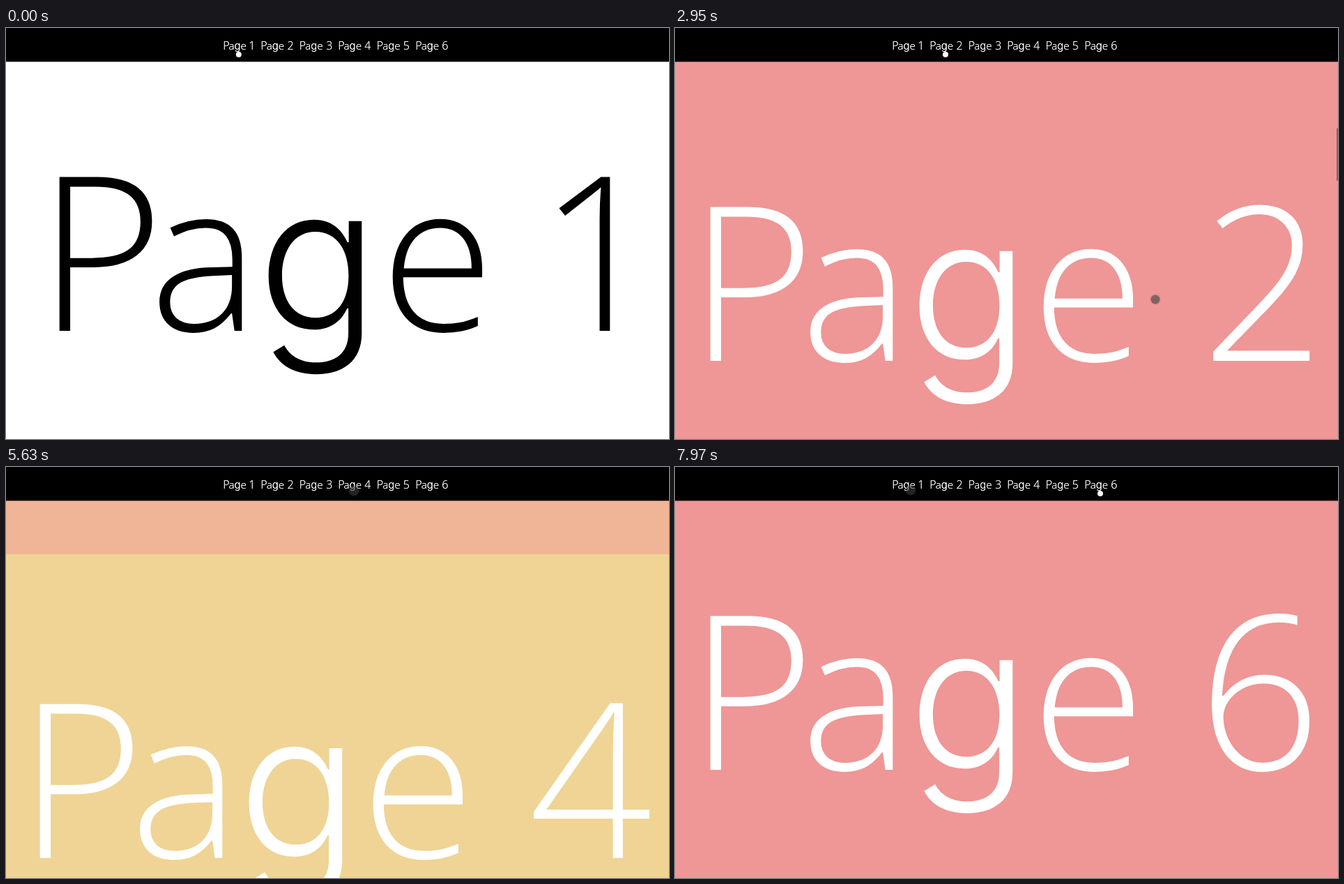
Animation of 951x589 px, one loop 8000 ms. Source, as an HTML page with a canvas:

```html
<!DOCTYPE html>
<html lang="en">
<head>
<meta charset="utf-8">
<title>Pages</title>
<style>
  html, body { margin: 0; width: 100%; height: 100%; overflow: hidden; background: #fff; }
  canvas { display: block; }
</style>
</head>
<body>
<canvas id="stage" width="951" height="589"></canvas>
<script>
const W = 951, H = 589, LOOP = 8000, SCREEN = 607, BAR = 48.4, LEFT = 51;
const ctx = document.getElementById('stage').getContext('2d');

const clamp = v => Math.max(0, Math.min(1, v));
const easeOut = p => 1 - (1 - p) ** 3;
const sine = p => (1 - Math.cos(Math.PI * p)) / 2;
const gather = p => p ** 1.196;

// The second page is three screens tall; its text sits in the middle one.
let nextTop = 0;
const pages = [1, 2, 3, 4, 5, 6].map(n => {
  const span = n === 2 ? 3 : 1;
  const top = nextTop * SCREEN;
  nextTop += span;
  const slack = (span - 1) / 2 * SCREEN;
  return {
    n, top, slack,
    rest: top + slack,
    color: n === 1 ? '#fff' : `hsl(${(n - 2) % 4 * 21} 73% 76.2%)`,
    ink: n === 1 ? '#000' : '#fff',
    x: n === 1 ? LEFT + 26 : n === 4 ? LEFT - 2 : LEFT
  };
});

// Moves: start, duration, value to reach, easing
const scrollMoves = [
  [700, 2320, pages[1].rest, gather],
  [3160, 340, pages[1].rest + 800, easeOut],
  [3630, 400, pages[2].rest, easeOut],
  [5230, 574, pages[3].rest, sine],
  [6650, 680, pages[5].rest, sine]
];
const pointerMoves = [
  [190, 140, { x: 689, y: 389 }],
  [4400, 620, { x: 499, y: 34 }],
  [5850, 600, { x: 615, y: 28, sag: 13 }],
  [7350, 620, { x: 338, y: 33, sag: 15 }]
];

function scrollAt(t) {
  return scrollMoves.reduce((v, [start, time, to, ease]) =>
    v + (to - v) * ease(clamp((t - start) / time)), 0);
}

function pointerAt(t) {
  return pointerMoves.reduce((at, [start, time, to]) => {
    const p = sine(clamp((t - start) / time));
    return {
      x: at.x + (to.x - at.x) * p,
      y: at.y + (to.y - at.y) * p + (to.sag || 0) * Math.sin(Math.PI * p)
    };
  }, { x: 840, y: 500 });
}

// Each glyph is sized by cap or x-height and centred on its slot in the word.
const glyphs = {};
for (const ch of 'Page123456') {
  const low = 'age'.includes(ch);
  const family = ch === 'g' ? 'Inter, Roboto, sans-serif' : '"Open Sans", "Noto Sans", sans-serif';
  ctx.font = `300 1000px ${family}`;
  const box = ctx.measureText(ch);
  const ascent = ctx.measureText(low ? ch : 'P').actualBoundingBoxAscent;
  const size = (low ? 162 : 222) / ascent;
  const middle = (box.actualBoundingBoxRight - box.actualBoundingBoxLeft) / 2;
  glyphs[ch] = { family, size: size * 1000, shift: -middle * size };
}
const slots = [65, 203, 367, 541.5];

function label(n, x, y, scale) {
  [...'Page' + n].forEach((ch, i) => {
    const g = glyphs[ch];
    const slot = slots[i] || (n === 1 ? 754 : 791);
    ctx.font = `300 ${g.size * scale}px ${g.family}`;
    ctx.fillText(ch, x + (slot + g.shift) * scale, y);
  });
}

function disc(x, y, r, color) {
  ctx.fillStyle = color;
  ctx.beginPath();
  ctx.arc(x, y, r, 0, 2 * Math.PI);
  ctx.fill();
}

function drawPages(scroll) {
  for (const page of pages) {
    ctx.fillStyle = page.color;
    ctx.fillRect(0, Math.round(page.top - 1 - scroll), W, 3 * SCREEN);
  }
  for (const page of pages) {
    ctx.fillStyle = page.ink;
    label(page.n, page.x, page.rest - scroll + 434, 1);
  }
}

function drawNav(scroll) {
  ctx.fillStyle = '#000';
  ctx.fillRect(0, 0, W, BAR);
  for (const page of pages) {
    const x = 256 + 55.5 * page.n + (page.x - LEFT) * 0.05;
    ctx.fillStyle = '#fff';
    // a second pass firms up the thin strokes
    for (let pass = 0; pass < 2; pass++) label(page.n, x, 31, 0.0517);
    const away = Math.abs(scroll - page.rest) - page.slack;
    disc(x + 21, 38, 4 * clamp((130 - away) / 50), '#fff');
  }
}

function drawScrollbar(t, scroll) {
  if (t < 730) return;
  ctx.fillStyle = `rgba(0,0,0,${0.38 * clamp((4700 - t) / 170)})`;
  ctx.fillRect(W - 2, scroll * 0.1236 - 1, 2, 75);
}

function drawPointer(t) {
  if (t < 190) return;
  const { x, y } = pointerAt(t);
  disc(x, y, 7.5, 'rgba(110,110,110,.3)');
  disc(x, y, 6.3, 'rgba(40,40,48,.42)');
}

function frame(now) {
  const t = now % LOOP, scroll = scrollAt(t);
  drawPages(scroll);
  drawNav(scroll);
  drawScrollbar(t, scroll);
  drawPointer(t);
  requestAnimationFrame(frame);
}
requestAnimationFrame(frame);
</script>
</body>
</html>
```
